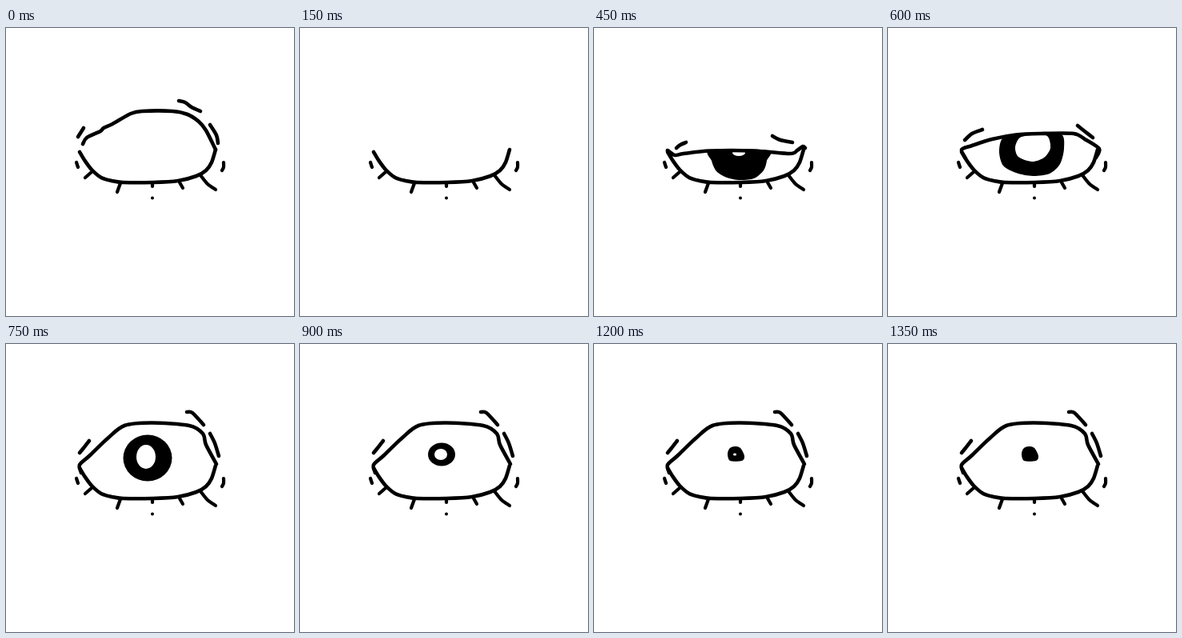
An HTML page with a canvas that plays this animation: 360x360 px, repeating every 1500 ms.

```html
<!DOCTYPE html>
<html>
<head>
<meta charset="utf-8">
<title>Blinking eye</title>
<style>
html, body { margin: 0; width: 100%; height: 100%; overflow: hidden; background: #fff; }
canvas { display: block; width: 360px; height: 360px; }
</style>
</head>
<body>
<canvas id="eye" width="360" height="360"></canvas>
<script>
const ctx = document.getElementById('eye').getContext('2d');
const STEP = 150;

// "x,y x,y ..." to a smooth path through every point
function trace(text, closed) {
  const p = text.split(' ').map(s => s.split(',').map(Number));
  const n = p.length;
  const at = i => closed ? p[(i + n) % n] : p[Math.max(0, Math.min(n - 1, i))];
  const k = 1 / 7;
  ctx.beginPath();
  ctx.moveTo(...p[0]);
  for (let i = 0; i < (closed ? n : n - 1); i++) {
    const [a, b, c, d] = [at(i - 1), at(i), at(i + 1), at(i + 2)];
    ctx.bezierCurveTo(
      b[0] + (c[0] - a[0]) * k, b[1] + (c[1] - a[1]) * k,
      c[0] - (d[0] - b[0]) * k, c[1] - (d[1] - b[1]) * k, c[0], c[1]);
  }
}

function line(text, width = 4.6) {
  trace(text);
  ctx.lineWidth = width;
  ctx.stroke();
}

function blob(text, color = '#000') {
  trace(text, true);
  ctx.fillStyle = color;
  ctx.fill();
}

function oval(x, y, rx, ry, color = '#000') {
  ctx.beginPath();
  ctx.ellipse(x, y, rx, ry, 0, 0, Math.PI * 2);
  ctx.fillStyle = color;
  ctx.fill();
}

function lowerLid() {
  line('92,155 98,165 107,177 119,187 132,191 146,193 184,193 215,191 238,185 250,178 257,168 262,152');
  ['107,180 99,187', '143,194 139,205', '183,195 183,198', '217,193 221,200',
   '243,184 252,195 262,202', '88,168 90,174', '272,168 272,174 270,178'].forEach(s => line(s, 4.2));
  oval(183, 212.5, 2, 2);
}

function upperLid(lid, ...creases) {
  line(lid);
  creases.forEach(s => line(s));
}

function wideLid() {
  upperLid('94,161 92,151 104,140 127,118 148,102 182,98.5 229,102 246,112 250,126 263,150',
    '92,136 97,130 104,121', '226,85 233,86 247,101', '255,112 261,124 266,140');
}

const dot = '167,137 170,130 176,128 183,130 188,140 185,146 170,146';

const poses = [
  () => upperLid('96,145 101,137 118,129 122,125 133,120 156,107 170,104 208,104 227,108 241,117 250,128 262,152',
    '90,136 97,125', '216,91 224,93 232,99 243,104', '255,121 263,134 265,144'),

  () => {},

  () => {
    blob('161,171 183,170 204,171 204,182 195,189 172,189 163,183');
    upperLid('95,160 92,153 101,158 130,165 170,172 200,172 240,165 256,156 265,150 260,165',
      '102,149 108,153 120,153', '218,156 236,151 250,147');
  },

  () => {
    blob('146,153 147,166 153,179 166,187 182,190 200,188 212,178 216,166 217,153');
    oval(181, 156, 8, 4, '#fff');
    upperLid('96,161 92,153 101,159 112,157 145,153.5 200,153.5 245,157 254,153 261,148 264,150',
      '103,150 108,146 115,143', '223,135 233,140 248,143');
  },

  () => {
    blob('143,138 139,155 144,172 160,181 181,185 202,182 215,170 220,151 217,133 190,131 160,133');
    blob('165,137 159,149 163,161 180,167 195,162 203,150 199,135 181,134', '#fff');
    upperLid('97,163 92,152 105,147 130,139 160,133.5 190,132 232,132 246,139 264,151 260,162',
      '96,140 105,132 118,127', '237,122 247,130 256,137');
  },

  () => {
    oval(177, 142.5, 30.5, 29);
    oval(175, 141, 12, 15, '#fff');
    wideLid();
  },

  () => {
    oval(177, 138, 17, 14.5);
    oval(176, 138, 8, 7, '#fff');
    wideLid();
  },

  () => {
    blob('161,139 164,130 172,126 182,127 188,136 190,147 179,150 164,148');
    blob('169,139 173,136 177,133 181,138 181,141 174,140', '#fff');
    wideLid();
  },

  () => {
    blob(dot);
    oval(176, 138, 2, 1.5, '#fff');
    wideLid();
  },

  () => {
    blob(dot);
    wideLid();
  }
];

function draw(pose) {
  ctx.fillStyle = '#fff';
  ctx.fillRect(0, 0, 360, 360);
  ctx.strokeStyle = '#000';
  ctx.lineCap = ctx.lineJoin = 'round';
  poses[pose]();
  lowerLid();
}

const start = performance.now();
function tick(now) {
  draw(Math.floor(Math.max(0, now - start) / STEP) % poses.length);
  requestAnimationFrame(tick);
}
draw(0);
requestAnimationFrame(tick);
</script>
</body>
</html>
```
